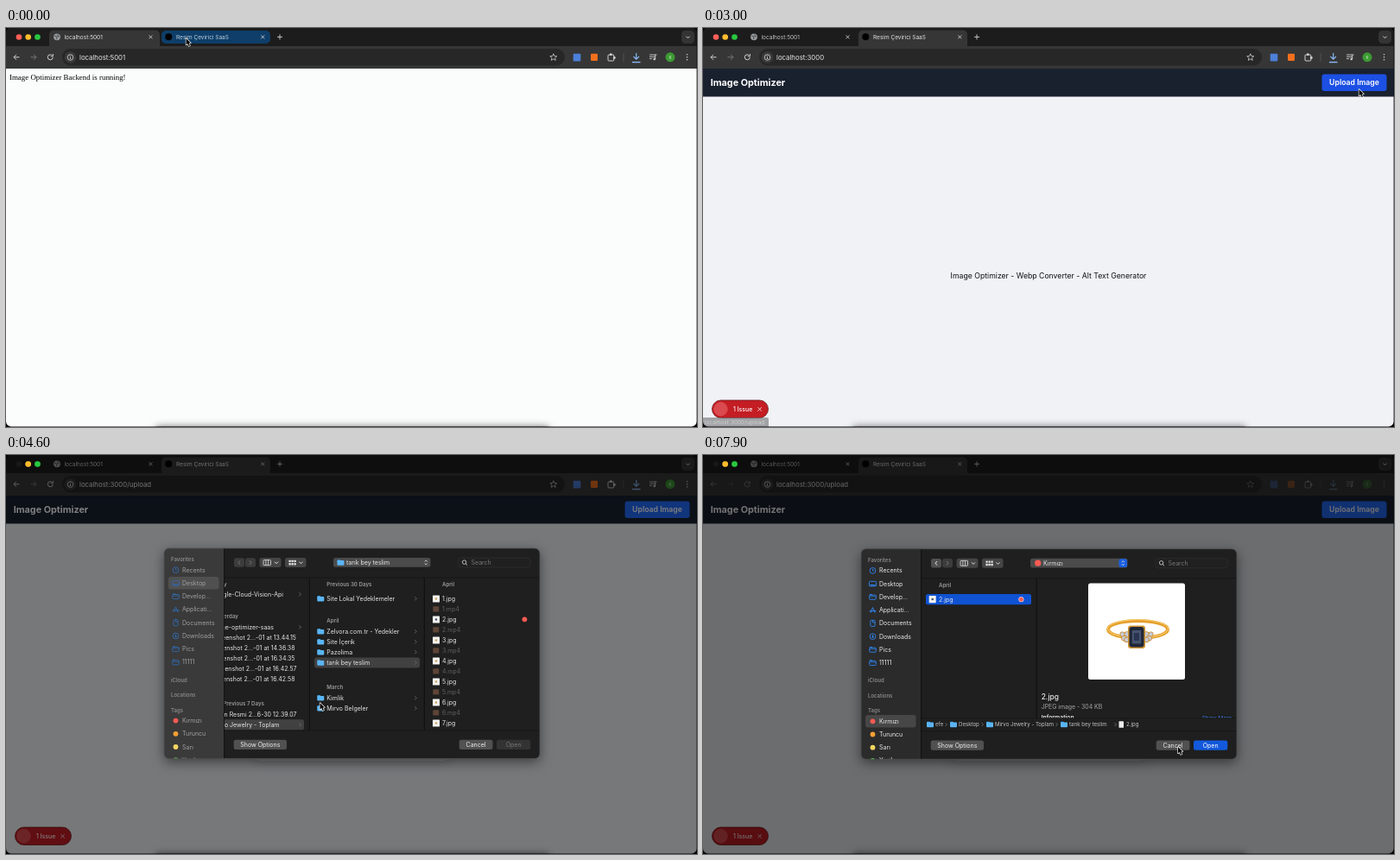
An HTML page with a canvas for the animation above (8000 ms loop, 800 by 462 pixels).

```html
<!DOCTYPE html>
<html lang="en">
<head>
<meta charset="utf-8">
<title>Image Optimizer</title>
<style>
html, body { margin: 0; width: 100%; height: 100%; overflow: hidden; background: #000; }
canvas { display: block; width: 800px; height: 462px; }
</style>
</head>
<body>
<canvas id="stage"></canvas>
<script>
const W = 800, H = 462, LOOP = 8000;
const canvas = document.getElementById('stage');
const dpr = window.devicePixelRatio || 1;
canvas.width = W * dpr;
canvas.height = H * dpr;
const c = canvas.getContext('2d');
const SANS = 'Inter, Roboto, "Liberation Sans", sans-serif';
const APP = 'Resim Çevirici SaaS';

// timeline, ms
const T = { tip: 700, tab: 1500, hover: 2750, leave: 3600, upload: 3400, sheet: 4440,
            focus: 4800, tag: 6050, list: 6150, pick: 7050 };
const PATH = [
  [0, 208.5, 12], [1750, 208.5, 12], [2850, 759.5, 71], [3500, 759.5, 71],
  [4300, 363.5, 287], [5050, 363.5, 287], [5800, 208.5, 303.5], [6350, 208.5, 303.5],
  [6950, 297, 165], [7200, 297, 165], [7500, 553, 356], [7650, 553, 356],
  [7880, 550, 338], [8000, 550, 338]
];

const clamp = v => Math.max(0, Math.min(1, v));
const ramp = (t, a, b) => clamp((t - a) / (b - a));
const ease = u => u * u * (3 - 2 * u);
const mix = (a, b, u) => a + (b - a) * u;
const gray = v => `rgb(${v},${v},${v})`;

function box(x, y, x2, y2, r, fill, stroke, lw = 0.6) {
  c.beginPath();
  c.roundRect(x, y, x2 - x, y2 - y, r);
  if (fill) { c.fillStyle = fill; c.fill(); }
  if (stroke) { c.strokeStyle = stroke; c.lineWidth = lw; c.stroke(); }
}
function dot(x, y, r, fill) {
  c.beginPath();
  c.arc(x, y, r, 0, 7);
  c.fillStyle = fill;
  c.fill();
}
function ring(x, y, r, color, lw = 0.9) {
  c.beginPath();
  c.arc(x, y, r, 0, 7);
  c.strokeStyle = color;
  c.lineWidth = lw;
  c.stroke();
}
function line(color, lw, ...p) {
  c.beginPath();
  c.moveTo(p[0], p[1]);
  for (let i = 2; i < p.length; i += 2) c.lineTo(p[i], p[i + 1]);
  c.strokeStyle = color;
  c.lineWidth = lw;
  c.stroke();
}
// y is the middle of the cap height
function text(s, x, y, size, color, weight = 400, align = 'left', family = SANS) {
  c.font = `${weight} ${size}px ${family}`;
  c.textAlign = align;
  c.fillStyle = color;
  c.fillText(s, x, y + size * 0.36);
}
function cross(x, y, r, color) {
  line(color, 0.9, x - r, y - r, x + r, y + r);
  line(color, 0.9, x + r, y - r, x - r, y + r);
}
function shadow(blur, color, dy = 0) {
  c.shadowBlur = blur * dpr;
  c.shadowColor = color;
  c.shadowOffsetY = dy * dpr;
}
const noShadow = () => shadow(0, 'transparent');
const chevron = (x, y, color = '#777') => line(color, 0.8, x - 1, y - 2, x + 1, y, x - 1, y + 2);
const downArrow = (x, y, color) => line(color, 1, x - 2, y - 1, x, y + 1, x + 2, y - 1);
function upDown(x, y) {
  line('#eee', 0.8, x - 1.4, y - 1, x, y - 2.6, x + 1.4, y - 1);
  line('#eee', 0.8, x - 1.4, y + 1, x, y + 2.6, x + 1.4, y + 1);
}
function folder(x, y) {
  box(x, y - 3.2, x + 4, y, 1, '#3f9be0');
  box(x, y - 2.4, x + 8, y + 3.2, 1, '#5bb5f4');
}

function globe(x, y) {
  dot(x, y, 3.9, '#9a9da0');
  line('#55585a', 1.2, x - 3, y - 1.2, x, y - 0.4, x - 0.5, y + 2.8);
  line('#55585a', 1.2, x + 0.5, y - 3, x + 1.8, y - 0.5, x + 3, y);
}

function tabs(t) {
  c.fillStyle = '#1c1c1c';
  c.fillRect(0, 0, W, 22);
  const second = t >= T.tab;
  const x = second ? 180 : 50;
  box(x, 2.5, x + (second ? 126 : 128), 28, 5, '#363636');
  if (!second) box(180, 3, 306, 18, 5, '#0e3e69');
  const modal = t >= T.sheet + 60;
  dot(15, 10.5, 3.3, modal ? '#333' : '#ff5f57');
  dot(25.7, 10.5, 3.3, '#febc2e');
  dot(36.5, 10.5, 3.3, '#28c840');
  globe(59, 10.3);
  text('localhost:5001', 67.5, 10.4, 6.5, second ? '#c4c4c4' : '#e4e4e4');
  dot(188.3, 10.3, 4, '#000');
  text(APP, 197, 10.4, 6.5, second ? '#e4e4e4' : '#bed0e0');
  cross(167.5, 10.4, 1.9, '#d4d4d4');
  cross(297.3, 10.4, 1.9, '#d4d4d4');
  line('#d0d0d0', 0.9, 314, 10.4, 320, 10.4);
  line('#d0d0d0', 0.9, 317, 7.4, 317, 13.4);
  box(782, 3, 797, 18, 4.5, '#343434');
  downArrow(789.5, 10.7, '#ddd');
}

function toolbar(t) {
  c.fillStyle = '#363636';
  c.fillRect(0, 21, W, 26);
  box(65, 24, 647, 43.5, 9.8, '#272727');
  const url = t < T.tab ? ':5001' : t < T.upload ? ':3000' : ':3000/upload';
  dot(74.5, 34, 6.8, '#3a3a3a');
  ring(74.5, 34, 3.3, '#d8d8d8', 0.8);
  line('#d8d8d8', 0.9, 74.5, 33.6, 74.5, 36);
  line('#d8d8d8', 0.9, 74.5, 31.8, 74.5, 32.6);
  text('localhost' + url, 85, 34, 7.8, '#e6e6e6');

  c.save();
  c.globalAlpha = 1 - 0.6 * ramp(t, T.sheet + 100, T.focus + 100);
  const ink = '#d0d0d0';
  line(ink, 1, 15.5, 33.8, 9, 33.8);
  line(ink, 1, 12, 30.8, 9, 33.8, 12, 36.8);
  line('#777', 1, 28.5, 33.8, 35, 33.8);
  line('#777', 1, 32, 30.8, 35, 33.8, 32, 36.8);
  c.beginPath();
  c.arc(51.3, 33.8, 3, 0, 5.4);
  c.strokeStyle = ink;
  c.lineWidth = 1;
  c.stroke();
  line(ink, 1, 54.4, 30, 54.4, 32.7, 51.8, 32.7);

  c.beginPath();
  for (let i = 0; i < 10; i++) {
    const a = -Math.PI / 2 + i * Math.PI / 5, r = i % 2 ? 1.9 : 4.2;
    c.lineTo(633.8 + r * Math.cos(a), 34 + r * Math.sin(a));
  }
  c.closePath();
  c.strokeStyle = ink;
  c.lineWidth = 0.8;
  c.stroke();
  box(656.7, 29.8, 665.3, 38.4, 1, '#4c7fd8');
  box(677, 29.8, 685, 38, 1, '#f2701d');
  box(697, 31, 703.8, 38, 1, null, ink, 1);
  dot(700.3, 30.7, 1.4, ink);
  dot(704.3, 34.5, 1.4, ink);
  line('#5a5a5a', 0.8, 715, 29, 715, 39);
  line('#8ab8f5', 1.2, 729.7, 29, 729.7, 36);
  line('#8ab8f5', 1.2, 726.5, 33, 729.7, 36.2, 732.9, 33);
  line('#8ab8f5', 1.4, 725, 39.6, 734.5, 39.6);
  for (let i = 0; i < 3; i++) line(ink, 0.9, 745, 31 + i * 2.3, i < 2 ? 752 : 748, 31 + i * 2.3);
  line(ink, 0.9, 753.5, 31, 751.7, 31, 751.7, 36);
  dot(750.7, 36, 1.3, ink);
  dot(769, 33.8, 5.5, '#3c9a32');
  text('K', 769, 33.9, 4.6, '#dceeda', 400, 'center');
  for (let i = -1; i < 2; i++) dot(788.5, 33.8 + i * 3, 0.8, ink);
  c.restore();
}

function badge() {
  box(10.5, 431, 75.5, 451.5, 10.2, '#c41d24', '#6c1a1c', 0.8);
  dot(20.5, 441.2, 8.2, '#da4a4e');
  text('1 Issue', 35, 441.3, 6.9, '#fff', 500);
  cross(65.6, 441.4, 2.2, '#f6dcdc');
}

function uploadCard() {
  c.letterSpacing = '-0.8px';
  text('Image Uploader', 400, 222.3, 19.6, '#0d1226', 800, 'center');
  c.letterSpacing = '0px';
  shadow(14, 'rgba(30,40,60,.13)', 4);
  box(286, 259.5, 515, 354, 9, '#fcfdfd');
  noShadow();
  box(303.3, 277, 497, 297, 10, '#fdfefe', '#dfe3e8', 0.7);
  text('Choose File No file chosen', 308, 287.2, 7.7, '#101318');
  shadow(7, 'rgba(40,60,90,.2)', 2);
  box(303, 306, 497, 332, 9, '#c2cddb');
  noShadow();
  text('Upload Image', 400, 319.3, 8.7, '#f2f5f9', 600, 'center');
}

function page(t) {
  if (t < T.tab) {
    c.fillStyle = '#fbfdfc';
    c.fillRect(0, 47, W, H);
    text('Image Optimizer Backend is running!', 4, 56.4, 8.9, '#000', 400, 'left',
      '"Liberation Serif", "Noto Serif", serif');
    return;
  }
  c.fillStyle = '#f0f2f6';
  c.fillRect(0, 47, W, H);
  c.fillStyle = '#19212f';
  c.fillRect(0, 47, W, 32.5);
  text('Image Optimizer', 8.7, 63.2, 10.8, '#fff', 700);
  const h = ramp(t, T.hover, T.hover + 130) * (1 - ramp(t, T.leave, T.leave + 130));
  box(716.5, 53.5, 791.5, 73, 3, `rgb(${mix(35, 28, h)},${mix(106, 80, h)},${mix(250, 228, h)})`);
  text('Upload Image', 754, 63.3, 8.7, '#fff', 600, 'center');
  if (t < T.upload)
    text('Image Optimizer - Webp Converter - Alt Text Generator', 400, 287, 8.7, '#101010', 400, 'center');
  else uploadCard();
  badge();

  const bubble = ramp(t, T.hover + 100, T.hover + 350) * (1 - ramp(t, T.leave, T.leave + 250));
  if (bubble) {
    c.globalAlpha = bubble;
    box(-3, 451, 76, 465, 2, '#6f7173');
    text('localhost:3000/upload', 2, 456.7, 6.5, '#f0f0f0');
    c.globalAlpha = 1;
  }
}

function tooltip(t) {
  const a = t < T.tab ? ramp(t, T.tip - 60, T.tip + 300) : 0;
  if (!a) return;
  c.globalAlpha = a;
  shadow(5, 'rgba(0,0,0,.5)', 1);
  box(173.7, 22, 313, 80, 6, '#1c1d1e');
  noShadow();
  box(173.7, 57, 313, 80, [0, 0, 6, 6], '#252627');
  text(APP, 180, 33.6, 7.2, '#ececec', 500);
  text('localhost:3000', 180, 45.6, 6.9, '#cfcfcf');
  c.beginPath();
  c.arc(184.4, 69, 3.2, 2.5, 6.9);
  c.closePath();
  c.strokeStyle = '#bbb';
  c.lineWidth = 0.8;
  c.stroke();
  line('#bbb', 0.8, 184.4, 69.5, 186, 67.5);
  text('Memory usage: 96.6 MB', 193.3, 68.7, 6.9, '#cfcfcf');
  c.globalAlpha = 1;
}

function sideIcon(i, x, y, blue) {
  if (i === 0 || i === 5) {
    ring(x, y, 3.4, blue);
    if (i) line(blue, 0.9, x, y - 2, x, y + 1.6);
    line(blue, 0.9, x - (i ? 1.4 : 0), y - (i ? 0 : 2), x, y + (i ? 1.6 : 0), x + 1.4, y);
  } else if (i === 1) {
    box(x - 4, y - 2.8, x + 4, y + 2.8, 1, null, blue, 0.9);
    line(blue, 1.2, x - 3, y + 1.4, x + 3, y + 1.4);
  } else if (i === 3) {
    line(blue, 1, x - 2.6, y + 3, x, y - 3, x + 2.6, y + 3);
    line(blue, 1, x - 4, y + 1, x + 4, y + 1);
  } else if (i === 4) {
    box(x - 2.6, y - 3.5, x + 2.6, y + 3.5, 0.8, null, blue, 0.9);
    line(blue, 0.9, x, y - 3.5, x, y - 1, x + 2.6, y - 1);
  } else {
    box(x - 3.8, y - 2.2, x + 3.8, y + 2.9, 1, null, blue, 0.9);
    line(blue, 1, x - 3.6, y - 2.8, x - 0.6, y - 2.8);
    line(blue, 0.7, x - 3.6, y - 0.6, x + 3.6, y - 0.6);
  }
}

function sidebar(t, focus) {
  c.fillStyle = gray(mix(58, 43, focus));
  c.fillRect(183, 108, 69.5, 245);
  const ink = gray(mix(160, 234, focus));
  const blue = focus > 0.5 ? '#2f86f2' : '#3169ad';
  const pickY = t < T.tag ? 149 : 308.2;
  box(188, pickY - 7.3, 246.5, pickY + 7.3, 3, focus > 0.5 ? '#474747' : '#505050');
  const head = (s, y) => text(s, 191, y, 6, '#898989', 600);
  head('Favorites', 121.8);
  ['Recents', 'Desktop', 'Develop...', 'Applicati...', 'Documents', 'Downloads', 'Pics', '11111']
    .forEach((s, i) => {
      const y = 133.9 + i * 15.25;
      sideIcon(i, 196.5, y, blue);
      text(s, 204, y, 7, ink);
    });
  head('iCloud', 261.3);
  head('Locations', 278.8);
  head('Tags', 296.2);
  [['Kırmızı', '#fc5a54'], ['Turuncu', '#f5a033'], ['Sarı', '#f3d55f'], ['Yeşil', '#65c75a']]
    .forEach(([s, color], i) => {
      const y = 308.3 + i * 15.2;
      dot(196.5, y, 2.9, color);
      text(s, 204, y, 7, ink);
    });
  line('#0c0c0c', 0.8, 252.6, 108, 252.6, 353);
}

function sheetTools(t, focus) {
  const tagged = t >= T.list, fill = '#454545', lit = '#e6e6e6';
  box(264, 120, 276, 130.5, 2.5, tagged ? '#515151' : '#3c3c3c');
  box(277, 120, 289, 130.5, 2.5, '#3c3c3c');
  line(tagged ? '#eee' : '#777', 1, 271, 123, 269, 125.3, 271, 127.6);
  line('#777', 1, 282, 123, 284, 125.3, 282, 127.6);
  box(293.5, 119.8, 318.5, 130.8, 2.5, fill);
  box(323, 119.8, 347.5, 130.8, 2.5, fill);
  box(298, 122.3, 306.5, 128.3, 0.8, null, lit, 0.8);
  line(lit, 0.8, 300.9, 122.3, 300.9, 128.3);
  line(lit, 0.8, 303.7, 122.3, 303.7, 128.3);
  downArrow(313, 125.4, lit);
  for (let i = 0; i < 6; i++) {
    const x = 327.5 + i % 3 * 3, y = 122.4 + (i > 2 ? 3.4 : 0);
    box(x, y, x + 2.2, y + 2.4, 0.5, lit);
  }
  downArrow(341.5, 125.4, lit);
  box(379, 119.8, 491.5, 130.5, 2.5, '#4b4b4b');
  if (focus > 0.5) box(481.5, 120.3, 491, 130, 2.3, '#1c5fe0');
  upDown(486.3, 125.2);
  if (tagged) {
    dot(387.7, 125.2, 3.6, '#fc5a54');
    text('Kırmızı', 394, 125.4, 7, lit);
  } else {
    folder(383.5, 125.2);
    text('tarık bey teslim', 394, 125.3, 7, lit);
  }
  box(524, 119.8, 607, 130.8, 2.5, '#202020', '#353535');
  ring(530.6, 124.8, 2.2, '#ccc');
  line('#ccc', 1, 532.2, 126.5, 534, 128.3);
  text('Search', 538.5, 125.4, 7, '#777');
}

const colHead = (s, x, y, align) => text(s, x, y, 6.2, '#999', 600, align);

function columns(focus) {
  const ink = '#e6e6e6';
  c.save();
  c.beginPath();
  c.rect(253, 143, 365, 176.5);
  c.clip();
  line('#0b0b0b', 0.8, 351.3, 143, 351.3, 320);
  line('#0b0b0b', 0.8, 484.3, 143, 484.3, 320);

  colHead('Today', 255.7, 150.6, 'right');
  colHead('Yesterday', 269, 187.6, 'right');
  colHead('Previous 7 Days', 299, 288.2, 'right');
  box(250, 307, 345, 319, 2.5, '#414141');
  const shot = s => 'Screenshot 2...-01 at ' + s;
  [['Google-Cloud-Vision-Api', 321, 162, 1], ['image-optimizer-saas', 310, 200, 1],
   [shot('13.44.15'), 336, 212], [shot('14.36.38'), 334.5, 224], [shot('16.34.35'), 334.5, 236],
   [shot('16.42.57'), 336.5, 248], [shot('16.42.58'), 334.5, 260],
   ['Ekran Resmi 2...6-30 12.39.07', 336.5, 300.7], ['Mirvo Jewelry - Toplam', 316.5, 313, 1]
  ].forEach(([s, x, y, dir]) => {
    text(s, x, y, 7, ink, 400, 'right');
    if (dir) chevron(340.5, y);
  });

  colHead('Previous 30 Days', 371.3, 150.6);
  colHead('April', 371.3, 192.6);
  colHead('March', 371.3, 269.2);
  box(357, 235.2, 479, 247.2, 2.5, focus > 0.5 ? '#0f55d6' : '#414141');
  [['Site Lokal Yedeklemeler', 167], ['Zelvora.com.tr - Yedekler', 205], ['Site İçerik', 217],
   ['Pazolima', 229], ['tarık bey teslim', 241.2], ['Kimlik', 282], ['Mirvo Belgeler', 294]
  ].forEach(([s, y]) => {
    folder(360.3, y);
    text(s, 371.3, y, 7, ink);
    chevron(474.3, y);
  });

  colHead('April', 505, 150.6);
  for (let i = 0; i < 7; i++) {
    const y = 167.2 + i * 24;
    box(494, y - 4, 502, y + 4, 0.6, '#f4f4f2');
    dot(498, y, 1.2, i === 1 ? '#46506a' : '#c9a25a');
    text(i + 1 + '.jpg', 505, y, 7, ink);
    box(494.3, y + 8.8, 501.3, y + 15, 0.6, '#5d4437');
    text(i + 1 + '.mp4', 505, y + 12, 7, '#5f5f5f');
  }
  dot(600.4, 191, 2.9, '#fc5a54');
  c.restore();
}

function jewel() {
  box(446, 148.5, 558, 260, 2.5, '#fff');
  c.lineWidth = 4;
  c.strokeStyle = '#e6a02d';
  c.beginPath();
  c.ellipse(503.5, 202, 34.5, 10, 0, 0, 7);
  c.stroke();
  c.lineWidth = 1;
  c.strokeStyle = '#f8d37c';
  c.beginPath();
  c.ellipse(503.5, 201.2, 35, 10.5, 0, 0, 7);
  c.stroke();
  for (const s of [-1, 1])
    for (const [dx, dy, r] of [[11, 208, 3], [14.5, 212, 2.6], [16.5, 207.5, 2.2], [11.5, 214, 2.4]]) {
      dot(502 + s * dx, dy, r + 0.8, '#c98a2c');
      dot(502 + s * dx, dy, r, '#c9ccd6');
    }
  box(492, 197.5, 512, 224, 3, '#cf9432');
  box(493.5, 199, 510.5, 222.5, 3, '#1f2738');
  box(496.8, 203, 507.2, 218.5, 1, '#46536f');
  box(499, 206, 505, 215, 0, '#2a3450');
}

function tagView(picked) {
  const ink = '#eaeaea', bottom = picked ? 304.5 : 319.5;
  c.save();
  c.beginPath();
  c.rect(253, 143, 365, bottom - 143);
  c.clip();
  line('#0b0b0b', 0.8, 386.2, 143, 386.2, 320);
  colHead('April', 273, 150.6);
  if (picked) box(258, 161, 380, 173.3, 2.5, '#0f52d2');
  box(261.7, 163, 269.7, 171.2, 0.6, '#f4f4f2');
  dot(265.7, 167, 1.3, '#46506a');
  text('2.jpg', 273, 167.2, 7, ink);
  dot(368.4, 167.2, 3, picked ? '#fff' : '#fc5a54');
  dot(368.4, 167.2, 2.5, '#fc5a54');
  if (picked) {
    jewel();
    text('2.jpg', 391.7, 280.3, 8.4, ink, 500);
    text('JPEG image - 304 KB', 391.7, 291.5, 6.9, '#a8a8a8');
    text('Information', 391.7, 304, 6.8, ink, 600);
    text('Show More', 612, 304.2, 6.4, '#3d7cf0', 400, 'right');
  }
  c.restore();
  if (!picked) return;
  line('#111', 0.6, 253, 304.8, 618, 304.8);
  [['efe', 259], ['Desktop', 286], ['Mirvo Jewelry - Toplam', 328], ['tarık bey teslim', 414]]
    .forEach(([s, x], i) => {
      folder(x, 312);
      text(s, x + 10, 312.2, 6.1, '#c4c4c4');
      chevron([281.5, 323.5, 409.5, 477.5][i], 312.1);
    });
  box(481.5, 308.3, 487, 315.8, 0.6, '#eee');
  text('2.jpg', 490, 312.2, 6.1, '#c4c4c4');
}

function sheet(t) {
  const a = ramp(t, T.sheet, T.sheet + 130);
  if (!a) return;
  const focus = ramp(t, T.focus - 150, T.focus);
  const picked = t >= T.pick;
  c.save();
  c.fillStyle = `rgba(0,0,0,${0.5 * a + 0.05 * focus})`;
  c.fillRect(0, 0, W, H);
  dot(25.7, 10.5, 3.3, '#febc2e');
  dot(36.5, 10.5, 3.3, '#28c840');
  c.globalAlpha = a;
  c.translate(0, -0.7 * (1 - focus));
  shadow(14, 'rgba(0,0,0,.5)', 4);
  box(183, 108.7, 618, 352.3, 6, '#1e1f1e');
  noShadow();
  c.save();
  c.beginPath();
  c.roundRect(183, 108.7, 435, 243.6, 6);
  c.clip();
  sidebar(t, focus);
  line('#111', 0.6, 253, 142.6, 618, 142.6);
  line('#111', 0.6, 253, 319.7, 618, 319.7);
  sheetTools(t, focus);
  if (t < T.list) columns(focus);
  else tagView(picked);
  box(263.7, 330.5, 325, 341.7, 2.5, '#515151');
  text('Show Options', 294.3, 336.2, 7, '#eee', 400, 'center');
  box(524.7, 330.5, 563.5, 341.7, 2.5, '#515151');
  text('Cancel', 544, 336.2, 7, '#eee', 400, 'center');
  box(568, 330.5, 607.3, 341.7, 2.5, picked ? '#1359dc' : '#333');
  text('Open', 587.6, 336.2, 7, picked ? '#fff' : '#777', 400, 'center');
  c.restore();
  box(183, 108.7, 618, 352.3, 6, null, '#565656', 0.7);
  c.restore();
}

function windowEdge() {
  c.save();
  shadow(9, 'rgba(0,0,0,.55)');
  c.fillStyle = '#777';
  c.fillRect(174, 461.5, 454, 8);
  c.restore();
  c.beginPath();
  c.rect(0, 0, W, H);
  c.roundRect(0, -0.5, W - 0.4, H, 6);
  c.fillStyle = '#050505';
  c.fill('evenodd');
}

function cursor(t) {
  let i = 0;
  while (i < PATH.length - 2 && t >= PATH[i + 1][0]) i++;
  const [t0, x0, y0] = PATH[i], [t1, x1, y1] = PATH[i + 1];
  const u = ease(ramp(t, t0, t1));
  c.save();
  c.translate(mix(x0, x1, u), mix(y0, y1, u));
  c.beginPath();
  [[0, 0], [0, 7.6], [1.8, 6], [3.1, 9], [4.5, 8.4], [3.2, 5.5], [5.5, 5.4]]
    .forEach(p => c.lineTo(...p));
  c.closePath();
  c.lineJoin = 'round';
  c.lineWidth = 1.3;
  c.strokeStyle = '#fff';
  c.stroke();
  c.fillStyle = '#000';
  c.fill();
  c.restore();
}

function draw(t) {
  c.setTransform(dpr, 0, 0, dpr, 0, 0);
  tabs(t);
  toolbar(t);
  page(t);
  tooltip(t);
  windowEdge();
  sheet(t);
  cursor(t);
}

const start = performance.now();
function tick() {
  draw((performance.now() - start) % LOOP);
  requestAnimationFrame(tick);
}
tick();
</script>
</body>
</html>
```
